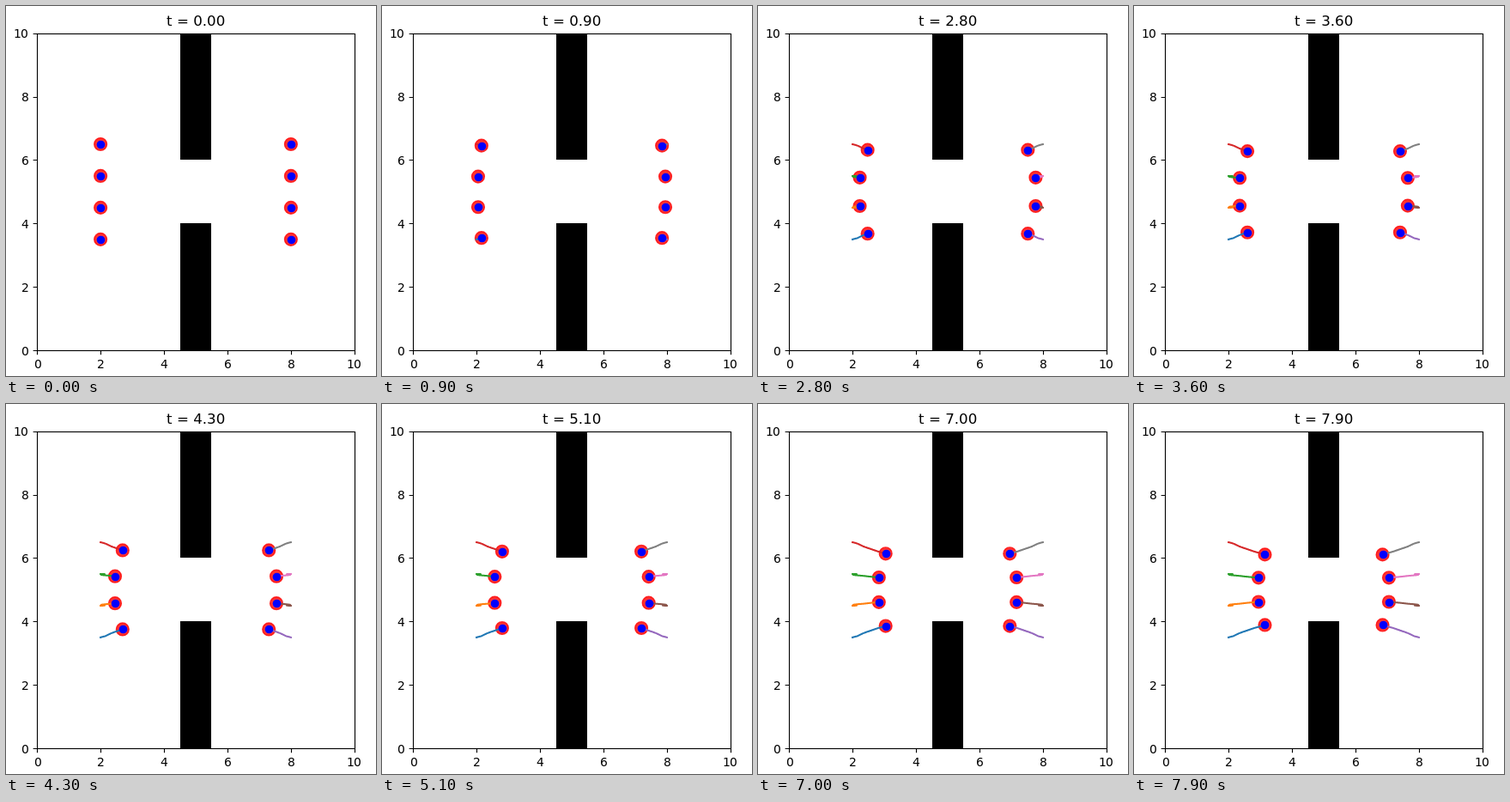
Write an HTML page that moves like this. It is 431 px wide and 431 px high and loops after 8 s.

```html
<!DOCTYPE html>
<html lang="en">
<head>
<meta charset="utf-8">
<title>Agents approaching a gap</title>
<style>
  html, body { margin: 0; width: 100%; height: 100%; overflow: hidden; background: #fff; }
  svg { display: block; width: 431px; height: 431px; }
  text { font-family: "DejaVu Sans", sans-serif; font-size: 13.89px; }
  .tick { letter-spacing: -.84px; }
  #title { font-size: 16.67px; }
</style>
</head>
<body>
<svg id="stage" viewBox="0 0 431 431"></svg>
<script>
const LOOP = 8000, STEP = 100, UNIT = 36.96;
const px = x => 36.2 + x * UNIT;
const py = y => 401.22 - y * UNIT;
const snap = v => Math.round(v) + .5;
const stage = document.getElementById('stage');

function add(tag, attrs, content = '') {
  const node = document.createElementNS('http://www.w3.org/2000/svg', tag);
  set(node, attrs);
  node.textContent = content;
  stage.appendChild(node);
  return node;
}

function set(node, attrs) {
  for (const key in attrs) node.setAttribute(key, attrs[key]);
}

// Keys: time in seconds, inward travel, travel towards the centre line.
const outerKeys = [
  [0, 0, 0], [.9, .155, .045], [2, .35, .135], [3.6, .594, .22],
  [5.1, .806, .293], [6.1, .938, .33], [7.9, 1.146, .39]
];
const innerKeys = [
  [0, 0, 0], [.45, .13, .004], [.9, .05, .018], [1.3, .02, .026],
  [2, .108, .04], [3.6, .352, .062], [5.1, .574, .087],
  [6.1, .715, .1], [7.9, .945, .118]
];

function slope(keys, i, axis) {
  const a = keys[Math.max(i - 1, 0)];
  const b = keys[Math.min(i + 1, keys.length - 1)];
  return (b[axis] - a[axis]) / (b[0] - a[0]);
}

function travel(keys, t, axis) {
  let i = 0;
  while (i < keys.length - 2 && t > keys[i + 1][0]) i++;
  const a = keys[i], b = keys[i + 1], span = b[0] - a[0];
  const u = (t - a[0]) / span, u2 = u * u, u3 = u2 * u;
  return (2 * u3 - 3 * u2 + 1) * a[axis] + (3 * u2 - 2 * u3) * b[axis] +
    span * ((u3 - 2 * u2 + u) * slope(keys, i, axis) +
            (u3 - u2) * slope(keys, i + 1, axis));
}

const colors = ['#1f77b4', '#ff7f0e', '#2ca02c', '#d62728',
                '#9467bd', '#8c564b', '#e377c2', '#7f7f7f'];

function makeAgent(color, i) {
  const row = i % 4, left = i < 4;
  const keys = row === 0 || row === 3 ? outerKeys : innerKeys;
  const points = Array.from({ length: LOOP / STEP }, (_, k) => {
    const t = k * STEP / 1000;
    const dx = travel(keys, t, 1), dy = travel(keys, t, 2);
    return [px(left ? 2 + dx : 8 - dx), py(3.5 + row + (row < 2 ? dy : -dy))];
  });
  return { color, points };
}

const agents = colors.map(makeAgent);

add('rect', { width: 431, height: 431, fill: '#fff' });
add('path', { d: 'M203 32h36v147h-36zM203 253h36v148h-36z' });
for (const agent of agents) {
  agent.disc = add('circle', {
    r: 7.39, fill: 'red', stroke: 'red', 'stroke-width': 1.39,
    'fill-opacity': .8, 'stroke-opacity': .8
  });
}
for (const agent of agents) {
  agent.trail = add('polyline', {
    fill: 'none', stroke: agent.color, 'stroke-width': 2.08,
    'stroke-linecap': 'square', 'stroke-linejoin': 'round'
  });
}
for (const agent of agents) agent.dot = add('circle', { r: 4.86, fill: 'blue' });

const axis = { fill: 'none', stroke: '#000', 'stroke-width': 1.11 };
add('rect', { x: 36.5, y: 32.5, width: 370, height: 369, ...axis });
for (let v = 0; v <= 10; v += 2) {
  const digits = String(v).length;
  add('path', { d: `M${snap(px(v))} 401.5v4.86M36.5 ${snap(py(v))}h-4.86`, ...axis });
  add('text', { class: 'tick', x: Math.round(px(v) - 5 * digits + 1.33), y: 422 }, v);
  add('text', { class: 'tick', x: 27 - 9 * digits, y: Math.round(py(v) + 5.4) }, v);
}
const title = add('text', { id: 'title', x: 221.2, y: 23.4, 'text-anchor': 'middle' });

function draw(ms) {
  const k = Math.floor((ms % LOOP) / STEP);
  title.textContent = 't = ' + (k * STEP / 1000).toFixed(2);
  for (const { points, trail, disc, dot } of agents) {
    const [x, y] = points[k];
    set(trail, { points: k ? points.slice(0, k + 1).join(' ') : '' });
    set(disc, { cx: x, cy: y });
    set(dot, { cx: snap(x), cy: snap(y) });
  }
}

const start = performance.now();
function tick() {
  draw(performance.now() - start);
  requestAnimationFrame(tick);
}
tick();
</script>
</body>
</html>
```
